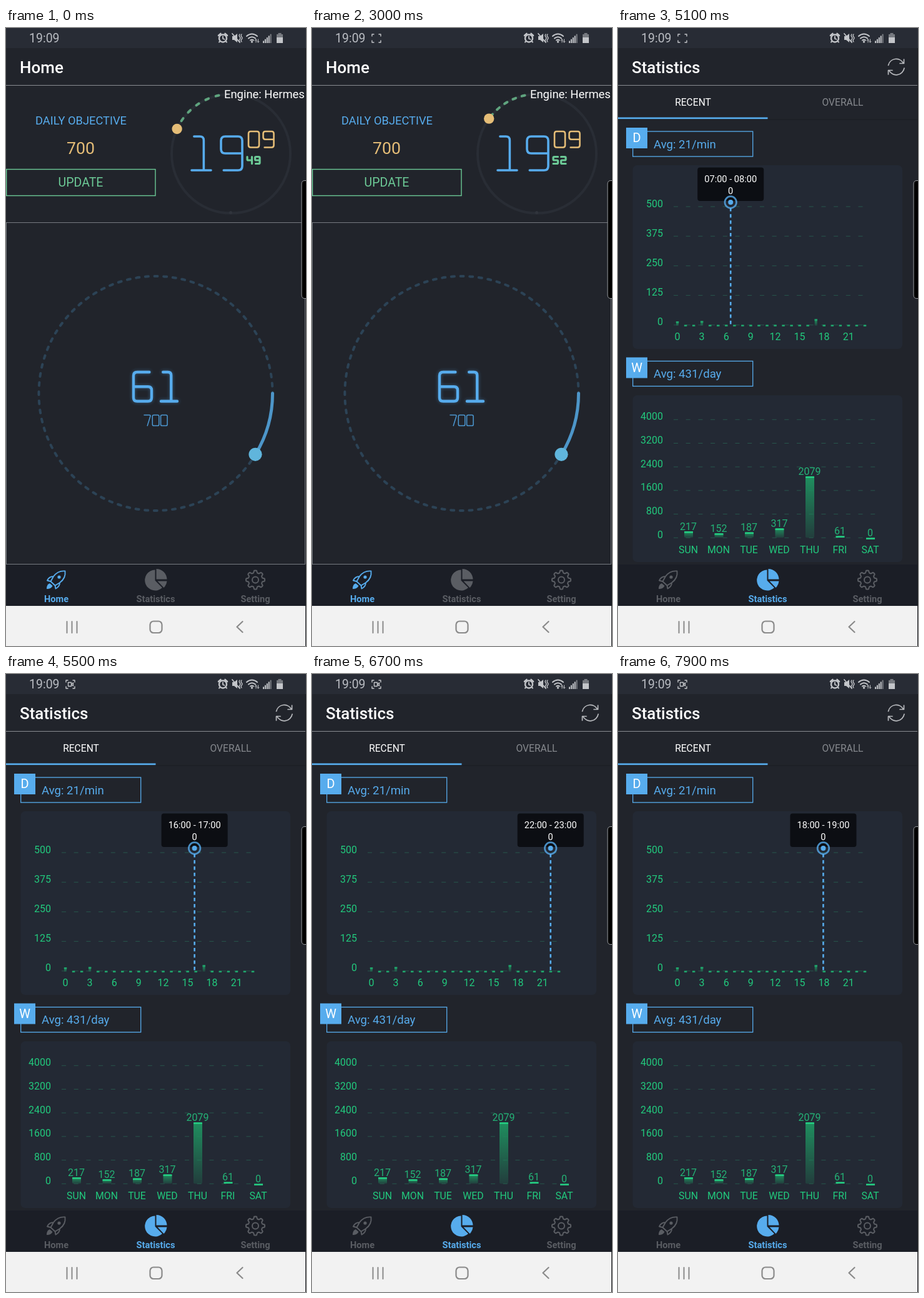
An HTML page that plays this animation: 480 by 986 pixels, repeating every 8000 ms.

```html
<!DOCTYPE html>
<html lang="en">
<head>
<meta charset="utf-8">
<title>Counter app</title>
<style>
html, body { margin: 0; width: 100%; height: 100%; overflow: hidden; background: #21242b; }
svg { display: block; width: 480px; height: 986px; font-family: Roboto, "Liberation Sans", sans-serif; }
.line { fill: none; stroke: currentColor; stroke-linecap: round; stroke-linejoin: round; }
</style>
</head>
<body>
<svg id="stage" viewBox="0 0 480 986"></svg>
<script>
const LOOP = 8000, SWITCH = 3400;
const BLUE = '#57aced', GOLD = '#e5bd77', GREEN = '#6cc996', MINT = '#22c97d', GREY = '#5a5d63', CARD = '#232934';
const stage = document.getElementById('stage');

const text = (s, x, y, size, fill, anchor = 'middle', extra = '') =>
  `<text x="${x}" y="${y}" font-size="${size}" fill="${fill}" text-anchor="${anchor}" ${extra}>${s}</text>`;
const rect = (x, y, w, h, fill, extra = '') =>
  `<rect x="${x}" y="${y}" width="${w}" height="${h}" fill="${fill}" ${extra}/>`;
const line = (d, color, width, extra = '') =>
  `<path class="line" d="${d}" color="${color}" stroke-width="${width}" ${extra}/>`;
const circle = (x, y, r, fill, extra = '') => `<circle cx="${x}" cy="${y}" r="${r}" fill="${fill}" ${extra}/>`;
const times = (n, fn) => Array.from({ length: n }, (_, i) => fn(i)).join('');
const clamp = v => Math.max(0, Math.min(1, v));
const easeOut = v => 1 - (1 - clamp(v)) ** 3;
const polar = (cx, cy, r, deg) => {
  const a = deg * Math.PI / 180;
  return [cx + r * Math.sin(a), cy - r * Math.cos(a)];
};

// Square digits as strokes over xy points, x from 0 to 8 and y from 0 to 2
const GLYPHS = {
  0: '40 80 82 02 00 40', 1: '10 50 52;02 82', 2: '00 80 81 01 02 82', 4: '00 01 81;80 82',
  5: '80 00 01 81 82 02', 6: '70 00 02 82 81 01', 7: '00 80 42', 9: '81 01 00 80 82 12'
};
function digit(ch, x, y, w, h) {
  const r = Math.min(w, h) * 0.2;
  return GLYPHS[ch].split(';').map(run => {
    const p = run.split(' ').map(q => [x + q[0] * w / 8, y + q[1] * h / 2]);
    const toward = (a, b) => {
      const k = r / Math.hypot(b[0] - a[0], b[1] - a[1]);
      return [a[0] + (b[0] - a[0]) * k, a[1] + (b[1] - a[1]) * k];
    };
    return 'M' + p[0] + p.slice(1, -1).map((c, i) =>
      'L' + toward(c, p[i]) + 'Q' + c + ' ' + toward(c, p[i + 2])).join('') + 'L' + p[p.length - 1];
  }).join('');
}
const digits = (s, x, y, w, h, step) => [...s].map((ch, i) => digit(ch, x + i * step, y, w, h)).join('');

function statusBar() {
  const c = '#c3c5c9';
  return rect(0, 0, 480, 32, '#282c35') + text('19:09', 37, 23, 19.5, '#b9bcc2', 'start') +
    `<g id="rec">${line('M96 13V10H99M107 10H110V13M110 20V23H107M99 23H96V20', c, 1.4)}
     <g id="cam">${line('M99.500 13.500H104.500V19.500H99.500ZM105 16L107.500 14V19L105 17', c, 1.3)}</g></g>` +
    circle(347, 16.5, 6, 'none', `stroke="${c}" stroke-width="2.4"`) +
    line('M347 13.500V17L349.500 18', c, 1.8) + line('M340 12L343.500 9M350.500 9L354 12', c, 2.6) +
    line('M342 21.500L341 22.500M352 21.500L353 22.500', c, 2) +
    `<path d="M362 13H365L370 9V23L365 19H362Z" fill="${c}"/>` +
    line('M362 9L374 23', c, 1.8) + line('M374 10Q372 12 374 14T374 18T374 22M377 10Q375 12 377 14T377 18T377 22', c, 1.3) +
    line('M385 13Q393.500 6 402 13M388 16.500Q393.500 12 399 16.500M391 19.500Q393.500 18 396 19.500', c, 2) +
    circle(393.5, 22, 1.7, c) + line('M400 18V23M398.500 20L400 18L401.500 20M403.500 18V23M402 21.500L403.500 23L405 21.500', c, 1) +
    times(5, i => rect(411 + i * 2.9, 20.5 - i * 2.7, 2, 3.5 + i * 2.7, c, i > 3 ? 'opacity=".55"' : '')) +
    rect(435.5, 8, 5, 3, '#777a80') + rect(433, 10, 10, 6, '#777a80') + rect(433, 15, 10, 9, c);
}

function header() {
  return text('Home', 22, 72, 26, '#fff', 'start', 'id="title" font-weight="500"') +
    rect(0, 91, 480, 1, '#8a8d92');
}

function homePage() {
  const steps = digit(6, 204, 549, 29, 46.5) + digit(1, 248, 549, 26, 46.5);
  return text('DAILY OBJECTIVE', 120, 154, 18.3, BLUE) + text('700', 119.5, 201, 26.7, GOLD) +
    rect(0.7, 225.5, 238.3, 42, 'none', `stroke="${GREEN}" stroke-width="1.4"`) +
    text('UPDATE', 119.5, 252.5, 19.5, GREEN) +
    circle(360, 200.5, 95, 'none', 'stroke="#292d35" stroke-width="4"') +
    circle(359.5, 294.5, 2.5, '#30343c') +
    line('', '#5fa47e', 4, 'id="ticks"') + circle(0, 0, 8.2, GOLD, 'id="hand"') +
    line(digit(1, 297, 173, 31, 54) + digit(9, 344, 173, 34, 54), BLUE, 3.6) +
    line(digits('09', 388, 165, 17, 25.5, 23.5), GOLD, 2.6) + line('', GREEN, 3.2, 'id="secs"') +
    text('Engine: Hermes', 349, 112, 18.4, '#fff', 'start') +
    rect(0.5, 310.5, 478, 545, 'none', 'stroke="#777b81"') +
    circle(239.5, 583, 187, 'none', 'stroke="#2c4356" stroke-width="4" stroke-linecap="round" stroke-dasharray="5 9.69" stroke-dashoffset="2.5"') +
    line(`M426.500 583A187 187 0 0 1 ${polar(239.5, 583, 187, 90 + 61 / 700 * 360)}`, '#4d96c9', 5) +
    circle(399, 680.3, 10.6, '#60b5dc') +
    line(steps, BLUE, 6, 'opacity=".3" filter="url(#glow)"') + line(steps, BLUE, 4.4) +
    line(digits('700', 221, 617.5, 10.5, 17, 13.3), '#4c98d2', 1.5);
}

const badge = (ch, y, label) =>
  rect(23.7, y + 6, 192, 40, 'none', `stroke="${BLUE}" stroke-width="1.3"`) +
  rect(13, y, 34, 33, BLUE) + text(ch, 30, y + 23, 20, '#fff') +
  text(label, 57, y + 32.5, 18.6, BLUE, 'start');

const axis = (top, gap, labels, right) => labels.map((s, i) =>
  text(s, 72, top + i * gap + 0.5, 16, MINT, 'end') +
  `<path d="M89 ${top + i * gap}H${right}" stroke="#27564c" stroke-dasharray="7 12.7"/>`).join('');

const hours = { 0: 16, 3: 18, 17: 27 };
const week = [['SUN', 217], ['MON', 152], ['TUE', 187], ['WED', 317], ['THU', 2079], ['FRI', 61], ['SAT', 0]];

function statsPage() {
  const hourBars = times(24, i => {
    const x = 95 + i * 13.04, h = hours[i] ? hours[i] * 0.34 : 0;
    return rect(x - 2, 475 - h, 4, h, 'url(#fade)') + rect(x - 2.2, 473.5 - h, 4.5, 2.6, '#20a66c');
  });
  const weekBars = week.map(([day, n], i) => {
    const x = 112.5 + i * 48.5;
    return `<g class="bar" data-n="${n}">${rect(x - 6.5, 0, 14, 0, 'url(#fade)', 'rx="2"')}
      ${rect(x - 6.5, 0, 14, 2.6, '#25cd82')}${text(n, x, 0, 16, '#24b276')}</g>` + text(day, x, 838, 15.8, MINT);
  }).join('');
  return badge('D', 159, 'Avg: 21/min') + rect(23.5, 219, 431.5, 293, CARD, 'rx="7"') +
    axis(285, 47.2, [500, 375, 250, 125, 0], 397) + hourBars +
    times(8, i => text(i * 3, 95 + i * 39.1, 498, 16, MINT)) +
    badge('W', 525.5, 'Avg: 431/day') + rect(23.5, 586, 431.5, 266, CARD, 'rx="7"') +
    axis(624.8, 37.7, [4000, 3200, 2400, 1600, 800, 0], 419) + weekBars +
    `<g id="cursor"><path d="M0 287V474" stroke="${BLUE}" stroke-width="2.6" stroke-dasharray="5.500 4.500"/>
      <g id="tip">${rect(-53, 222.5, 106, 53.5, '#0b0c10', 'rx="4" opacity=".9"')}
      ${text('', 0, 245.5, 14.6, '#fff', 'middle', 'id="span"')}${text('', 0, 265, 14.6, '#fff', 'middle', 'id="count"')}</g>
      ${circle(0, 278, 9.3, 'none', `stroke="${BLUE}" stroke-width="2.700" opacity=".8"`)}${circle(0, 278, 4, BLUE)}</g>` +
    rect(474, 146, 5, 475, '#191b21', 'id="scroll"') +
    text('RECENT', 120, 124, 15.6, '#fff') + text('OVERALL', 359.5, 124, 15.6, '#85888d') +
    rect(0, 145, 480, 2, '#1d2026') + rect(0, 142.5, 239.5, 2.7, BLUE) +
    line('M432.500 59.500A13 13 0 0 1 456.500 56M458 64A13 13 0 0 1 433.500 67.500M457.500 50V56.500H451M432.500 74V67.500H439', '#b8babe', 1.7);
}

function tabBar() {
  const gear = 'M' + Array.from({ length: 48 }, (_, i) => {
    const r = 13.2 + 1.9 * Math.tanh(2.5 * Math.cos(i * Math.PI / 3));
    return polar(399, 880.5, r, i * 7.5);
  }).join('L') + 'Z';
  const tab = (id, name, x, icon) =>
    `<g id="${id}" color="${GREY}">${icon}${text(name, x, 916, 14.6, 'currentColor', 'middle', 'font-weight="700"')}</g>`;
  const rocket = `<path class="line" stroke-width="1.900" d="M94.500 866.500Q83 865.500 76 875L71.500 883L78.500 889.500L86 885Q96 878 94.500 866.500Z
    M76 875Q69 875 66 881.500L71.500 883M86 885Q86 891 79.500 894.500L78.500 889.500"/>
    <path fill="currentColor" d="M70 886Q65 887.500 65 895Q72.500 895 74.500 890Z"/>
    <circle fill="currentColor" cx="85" cy="876" r="2.600"/>`;
  const pie = `<path fill="currentColor" d="M238.500 864.500V881.500L250 893A16.500 16.500 0 1 1 238.500 864.500Z
    M240.500 863A17 17 0 0 1 257.500 879.500H240.500ZM242.500 882.500H257.500A17 17 0 0 1 252.500 893Z"/>`;
  return rect(0, 856, 480, 66, '#1b1e26') + tab('home', 'Home', 80.5, rocket) +
    tab('stats', 'Statistics', 239.5, pie) +
    tab('setting', 'Setting', 399, `<path class="line" stroke-width="2" d="${gear}"/>
      <circle class="line" cx="399" cy="880.500" r="5" stroke-width="2"/>`);
}

function navBar() {
  const c = '#8a8a8a';
  return rect(0, 922, 480, 64, '#f2f2f2') +
    line('M97.500 947V965M105.500 947V965M113.500 947V965', c, 2) +
    rect(230.5, 946.5, 19, 18.5, 'none', `rx="5.500" stroke="${c}" stroke-width="2.200"`) +
    line('M378.500 947L369.500 955.500L378.500 964', c, 2.2) + rect(479, 32, 1, 954, '#15171b');
}

stage.innerHTML = `<defs>
  <filter id="glow" x="-30%" y="-30%" width="160%" height="160%"><feGaussianBlur stdDeviation="2.5"/></filter>
  <linearGradient id="fade" x2="0" y2="1"><stop stop-color="#1f8f5f"/><stop offset="1" stop-color="#1f8f5f" stop-opacity=".2"/></linearGradient>
  </defs>` + rect(0, 0, 480, 986, '#21242b') + statusBar() + header() +
  `<g id="homePage">${homePage()}</g><g id="statsPage">${statsPage()}</g>` + tabBar() + navBar() +
  '<path d="M481 243.500H478Q473 243.500 473 249V426Q473 431.500 478 431.500H481Z" fill="#000" stroke="#9a9da1"/>';

const $ = id => document.getElementById(id);
const set = (el, attrs) => { for (const k in attrs) el.setAttribute(k, attrs[k]); };
const show = (id, on) => set($(id), { visibility: on ? 'visible' : 'hidden' });

// Start, length, from, to
const TICKS = [[100, 800, 49.1, 50], [1400, 600, 50, 51], [3000, 400, 51, 52]];
// Time, hour under the finger
const DRAG = [[4800, 0], [5500, 16], [6000, 11.1], [6500, 23], [6700, 22], [7500, 19.4], [7900, 18]];

function hourAt(t) {
  const i = DRAG.findIndex(k => k[0] > t);
  if (i === 0) return 0;
  if (i < 0) return DRAG[DRAG.length - 1][1];
  const [t0, a] = DRAG[i - 1], [t1, b] = DRAG[i];
  return a + (b - a) * (t - t0) / (t1 - t0);
}

function drawClock(t) {
  const tick = TICKS.filter(k => k[0] <= t).pop();
  const sec = tick ? tick[2] + (tick[3] - tick[2]) * easeOut((t - tick[0]) / tick[1]) : 49.1;
  const [x, y] = polar(360, 200.5, 95, sec * 6);
  set($('hand'), { cx: x, cy: y });
  // The gaps close up as the remaining arc shrinks
  set($('ticks'), {
    d: `M${polar(360, 200.5, 95, -11.8)}A95 95 0 0 0 ${x} ${y}`,
    'stroke-dasharray': `5 ${(60 - sec) * 1.13}`
  });
  set($('secs'), { d: digits(String(tick ? tick[3] : 49), 386, 205.5, 7.5, 11, 12.5) });
}

function drawStats(t) {
  const grow = easeOut((t - SWITCH) / 600);
  document.querySelectorAll('.bar').forEach(bar => {
    const h = bar.dataset.n * 0.0471 * grow, top = 813.3 - h;
    const [body, cap, label] = bar.children;
    set(body, { y: top, height: h });
    set(cap, { y: top });
    set(label, { y: top - 2.3 });
  });
  const pos = hourAt(t), hour = Math.round(pos), two = n => String(n).padStart(2, '0');
  set($('cursor'), { transform: `translate(${88.5 + pos * 13.33} 0)`, opacity: 0.65 + 0.35 * clamp((t - 4800) / 150) });
  show('tip', t >= 4800);
  $('span').textContent = `${two(hour)}:00 - ${two(hour + 1)}:00`;
  $('count').textContent = hours[hour] || 0;
  set($('scroll'), { opacity: 1 - clamp((t - 4800) / 300) });
}

function draw(t) {
  const stats = t >= SWITCH;
  show('homePage', !stats);
  show('statsPage', stats);
  $('title').textContent = stats ? 'Statistics' : 'Home';
  set($('home'), { color: stats ? GREY : BLUE });
  set($('stats'), { color: stats ? BLUE : GREY });
  set($('rec'), { display: t < 500 ? 'none' : 'inline' });
  set($('cam'), { display: t % 1000 < 500 ? 'none' : 'inline' });
  drawClock(t);
  drawStats(t);
}

const start = performance.now();
function frame() {
  draw((performance.now() - start) % LOOP);
  requestAnimationFrame(frame);
}
frame();
</script>
</body>
</html>
```
